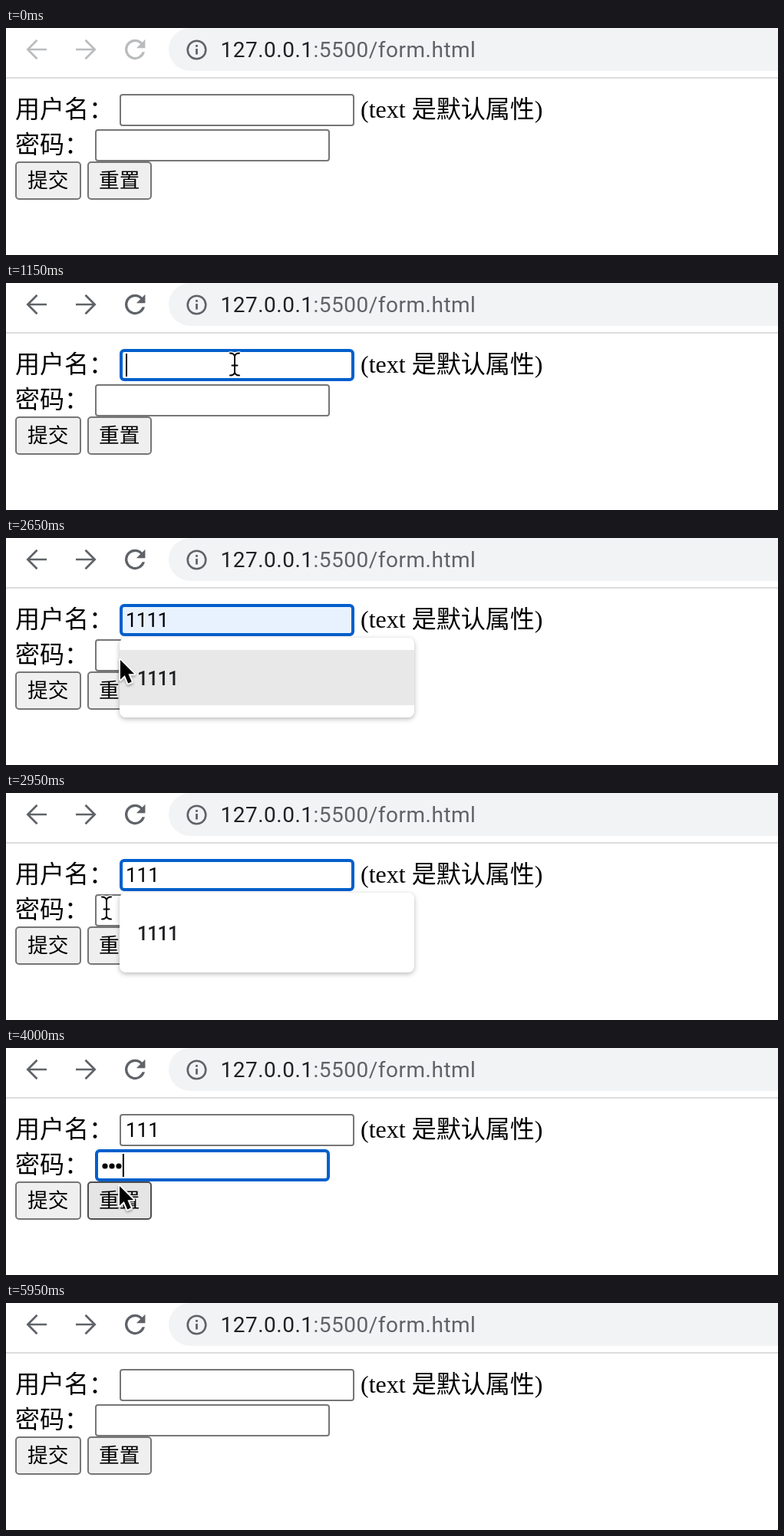
An HTML page that plays this animation: 1006 by 296 pixels, repeating every 7.13 s.

```html
<!DOCTYPE html>
<html lang="zh">
<head>
<meta charset="utf-8">
<title>form.html</title>
<style>
html, body { margin: 0; width: 100%; height: 100%; overflow: hidden; background: #fff; }
svg { display: block; width: 1006px; height: 296px; }
text { white-space: pre; font-kerning: none; }
.url { font: 28px Roboto, sans-serif; letter-spacing: .5px; fill: #5f6368; }
.page { font: 32px "Liberation Serif", "Noto Sans CJK SC", "Noto Sans CJK", serif; }
.ui { font: 26.67px "Liberation Sans", "Noto Sans CJK SC", "Noto Sans CJK", sans-serif; }
.input { font: 26px Roboto, sans-serif; }
.item { font: 500 25px Roboto, sans-serif; letter-spacing: -.9px; fill: #202124; }
#menu { filter: drop-shadow(0 2px 3px rgba(0, 0, 0, .28)); }
#arrow { filter: drop-shadow(0 2px 1.5px rgba(0, 0, 0, .3)); }
</style>
</head>
<body>
<svg viewBox="0 0 1006 296">
  <rect x="212" y="0" width="830" height="56" rx="28" fill="#f1f3f4"/>
  <rect y="64" width="1006" height="2" fill="#dcdddf"/>
  <g id="nav">
    <path d="M53 28H29M40.5 15.8L28.3 28L40.5 40.2M91 28H115M103.5 15.8L115.7 28L103.5 40.2" fill="none" stroke-width="2.7"/>
    <path transform="translate(148.4 8.2) scale(1.65)" stroke="none" d="M17.65 6.35A7.96 7.96 0 0 0 12 4a8 8 0 1 0 7.73 10h-2.08A6 6 0 1 1 12 6c1.66 0 3.14.69 4.22 1.78L13 11h7V4z"/>
  </g>
  <circle cx="248.5" cy="28.5" r="11.8" fill="none" stroke="#5f6368" stroke-width="2.6"/>
  <path d="M247.1 27h2.8v7.6h-2.8zM247.1 22h2.8v2.8h-2.8z" fill="#5f6368"/>
  <text class="url" x="279.5" y="38"><tspan fill="#202124">127.0.0.1</tspan>:5500/form.html</text>

  <text class="page" x="12" y="117">用户名：</text>
  <text class="page" x="462" y="117">(text 是默认属性)</text>
  <text class="page" x="12" y="163">密码：</text>
  <rect id="user"/>
  <rect id="pass"/>
  <text class="input" id="name" x="156" y="116"></text>
  <g id="dots">
    <circle cx="129" cy="154" r="3.6"/>
    <circle cx="138" cy="154" r="3.6"/>
    <circle cx="147" cy="154" r="3.6"/>
  </g>
  <rect id="caret" width="2" height="30"/>

  <rect x="13" y="175" width="84" height="48" rx="4" fill="#efefef" stroke="#767676" stroke-width="2"/>
  <rect id="reset" x="107" y="175" width="82" height="48" rx="4" stroke-width="2"/>
  <text class="ui" x="28" y="208">提交</text>
  <text class="ui" x="121" y="208">重置</text>

  <g id="menu">
    <rect id="panel" x="148" y="130" width="384" rx="8" fill="#fff"/>
    <rect id="mark" x="148" y="146" width="384" height="72" fill="#e8e8e8"/>
    <text class="item" id="first" x="171" y="192"></text>
    <text class="item" id="second" x="171" y="264">1111</text>
  </g>

  <g id="cursor">
    <path id="arrow" d="M0 0V25.5L5.8 20 10.2 30.5 14.8 28.6 10.4 18.2H18.2Z" stroke="#fff" stroke-width="4" stroke-linejoin="round" paint-order="stroke"/>
    <g id="beam" fill="none" stroke-linecap="round">
      <path stroke="#fff" stroke-width="4.5"/>
      <path stroke="#000" stroke-width="2"/>
    </g>
  </g>
</svg>
<script>
const LOOP = 7130, STEP = 50;
const $ = id => document.getElementById(id);
const set = (id, attrs) => { for (const k in attrs) $(id).setAttribute(k, attrs[k]); };
const show = (id, on) => set(id, { visibility: on ? 'inherit' : 'hidden' });

for (const p of $('beam').children)
  p.setAttribute('d', 'M-6 -14.5Q-1 -14.5 0 -10.5Q1 -14.5 6 -14.5M-6 14.5Q-1 14.5 0 10.5Q1 14.5 6 14.5M0 -10.5V10.5M-3.5 1.5H3.5');

// Spans in which the pointer is seen, with its way as [time, x, y]
const paths = [
  { from: 50, to: 150, way: [[50, 128, 140]] },
  { from: 400, to: 1150, way: [[400, 324, 247], [500, 320, 208], [600, 311, 160], [700, 302, 126], [850, 297, 106]] },
  { from: 1150, to: 1500, way: [[1150, 298, 106]] },
  { from: 2200, to: 3150, way: [[2200, 296, 108], [2300, 270, 148], [2450, 200, 166], [2650, 149, 159], [2750, 139, 153], [2900, 131, 150]] },
  { from: 3700, to: 5950, way: [[3700, 131, 150], [3850, 138, 164], [4000, 148, 180], [4250, 152, 188], [4950, 152, 188], [5100, 153, 188], [5650, 153, 188], [5800, 235, 214], [5900, 330, 255]] }
];

function cursorAt(t) {
  const path = paths.find(p => t >= p.from && t < p.to);
  if (!path) return null;
  const { way } = path;
  const i = way.findIndex(k => k[0] > t);
  if (i < 0) return way[way.length - 1].slice(1);
  const [a, ax, ay] = way[i - 1], [b, bx, by] = way[i];
  const f = (t - a) / (b - a);
  return [ax + (bx - ax) * f, ay + (by - ay) * f];
}

function field(id, x, y, focus, fill) {
  const w = focus ? 4 : 2;
  set(id, {
    x: x + w / 2, y: y + w / 2, width: 306 - w, height: 42 - w,
    rx: focus ? 4 : 3, fill, stroke: focus ? '#005fcc' : '#767676', 'stroke-width': w
  });
}

function draw(ms) {
  const t = Math.floor(ms / STEP) * STEP;
  const within = (a, b) => t >= a && t < b;
  const pos = cursorAt(t);
  const preview = within(2300, 2700);
  const onUser = within(1050, 3000), onPass = within(3000, 4350);

  const ink = t < 1050 ? '#babcbe' : '#5f6368';
  set('nav', { fill: ink, stroke: ink });
  field('user', 148, 86, onUser, preview ? '#e8f2ff' : '#fff');
  field('pass', 116, 132, onPass, '#fff');

  const typed = within(1500, 1600) ? '11' : within(1600, 4700) ? '111' : '';
  $('name').textContent = preview ? '1111' : typed;
  $('name').style.letterSpacing = preview ? '-.8px' : '0';

  const count = within(3150, 4700) ? Math.min(3, Math.floor((t - 3150) / 250) + 1) : 0;
  [...$('dots').children].forEach((d, i) => d.setAttribute('visibility', i < count ? 'visible' : 'hidden'));

  show('caret', within(1050, 2300) || onPass);
  set('caret', onPass ? { x: 124 + count * 9.3, y: 138 } : { x: 156 + typed.length * 14.6, y: 92 });

  const long = t < 1850;
  show('menu', within(1600, 3000));
  set('panel', { height: long ? 190 : 104 });
  $('first').textContent = long ? '111' : '1111';
  show('second', long);
  show('mark', preview);

  const hover = pos && t > 3700 && pos[0] >= 106 && pos[0] < 190 && pos[1] >= 174 && pos[1] < 224;
  const pressed = within(4350, 4700);
  set('reset', {
    fill: pressed ? '#f5f5f5' : hover ? '#e5e5e5' : '#efefef',
    stroke: pressed ? '#8d8d8d' : hover ? '#4f4f4f' : '#767676'
  });

  show('cursor', !!pos);
  if (!pos) return;
  const beam = within(1150, 2300) || within(2750, 3850);
  set('cursor', { transform: `translate(${pos})` });
  show('arrow', !beam);
  show('beam', beam);
}

const start = performance.now();
function frame() {
  draw((performance.now() - start) % LOOP);
  requestAnimationFrame(frame);
}
frame();
</script>
</body>
</html>
```
